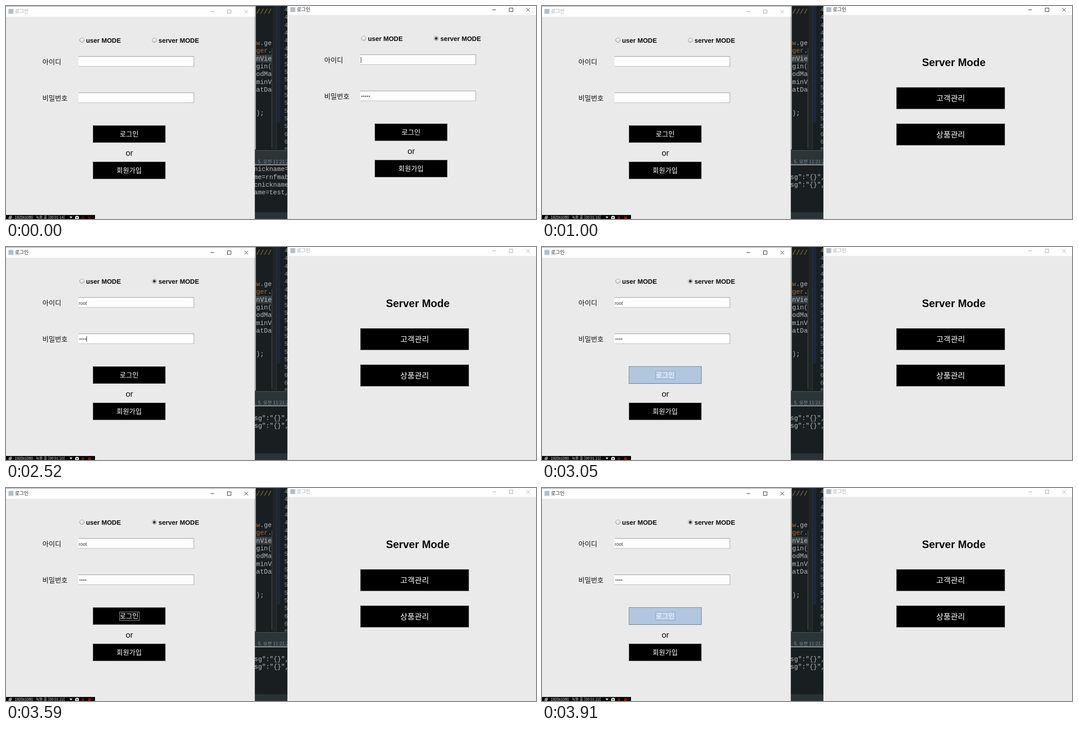
Animation of 1179x475 px, one loop 3.97 s. Source, as an HTML page:

```html
<!DOCTYPE html>
<html lang="ko">
<head>
<meta charset="utf-8">
<title>Login windows</title>
<style>
  html, body { margin: 0; width: 100%; height: 100%; overflow: hidden; background: #eaeaea; }
  svg { display: block; width: 1179px; height: 475px; }
  text { font-family: "Noto Sans CJK KR", "Noto Sans CJK", sans-serif; white-space: pre; }
  .latin { font-family: "Liberation Sans", Arial, sans-serif; }
  .bold { font-weight: 700; }
  .mono { font-family: "Liberation Mono", "Courier New", monospace; }
</style>
</head>
<body>
<svg id="stage" viewBox="0 0 1179 475" xmlns="http://www.w3.org/2000/svg"></svg>
<script>
const LOOP = 3970;
const stage = document.getElementById('stage');

const rect = (x, y, w, h, fill, extra = '') =>
  `<rect x="${x}" y="${y}" width="${w}" height="${h}" fill="${fill}" ${extra}/>`;
const path = (d, stroke, extra = '') =>
  `<path d="${d}" fill="none" stroke="${stroke}" ${extra}/>`;
const text = (x, y, size, fill, str, extra = '') =>
  `<text x="${x}" y="${y}" font-size="${size}" fill="${fill}" ${extra}>${str}</text>`;
const latin = 'class="latin"', bold = 'class="latin bold"', mono = 'class="mono"';
const middle = 'text-anchor="middle"';

const bevel = (x, y, w, h) =>
  path(`M${x + .5} ${y + h}V${y + .5}H${x + w}`, '#7c7c7c') +
  path(`M${x + w - .5} ${y}V${y + h - .5}H${x}`, '#6a6a6a');

function button(x, y, w, h, size, label, name) {
  return rect(x, y, w, h, '#000', `data-part="${name}"`) + bevel(x, y, w, h) +
    rect(x + 59.5, y + 10.5, 44, 19, 'none', `data-part="${name}Focus" visibility="hidden"`) +
    text(x + w / 2, y + h / 2 + size * .37, size, '#fff', label, middle);
}

const radio = (x, label, name) =>
  `<circle cx="${x}" cy="76.2" r="4.9" fill="url(#radioFill)" stroke="#7f8c99"/>` +
  `<circle cx="${x}" cy="76.2" r="2.9" fill="#2d3136" visibility="hidden" data-part="${name}"/>` +
  text(x + 9.2, 82.4, 14.4, '#0c0c0c', label, bold);

const field = y =>
  rect(161, y, 257.5, 24, '#fdfdfd') +
  path(`M161 ${y + .5}H418V${y + 23}`, '#8d9399') +
  path(`M161 ${y + 22.8}H418`, '#a2a8ae');

function loginForm() {
  const dots = [0, 1, 2, 3, 4].map(i =>
    `<circle cx="${164.8 + i * 4.15}" cy="205.3" r="1.3" fill="#333" data-part="dot"/>`).join('');
  return `<g data-part="form">` +
    radio(168.8, 'user MODE', 'userMode') + radio(330, 'server MODE', 'serverMode') +
    text(81, 130, 15.2, '#111', '아이디') + field(112) +
    text(81, 210.8, 15.2, '#111', '비밀번호') + field(193) +
    text(162, 128.6, 10.3, '#333', '', `${latin} data-part="id"`) + dots +
    rect(0, 0, 1, 13, '#222', 'data-part="caret"') +
    button(193, 266, 162, 39, 15.2, '로그인', 'login') +
    text(274.5, 334, 18.5, '#111', 'or', `${latin} ${middle}`) +
    button(193, 347, 162, 39, 15.2, '회원가입', 'join') + `</g>`;
}

const serverPanel = () =>
  `<g data-part="panel" visibility="hidden">` +
  text(289, 138.2, 23.6, '#080808', 'Server Mode', `${bold} ${middle}`) +
  button(161, 185, 242, 49, 17.4, '고객관리', 'customers') +
  button(161, 266, 242, 49, 17.4, '상품관리', 'goods') + `</g>`;

const appWindow = (id, dx, dy) =>
  `<g id="${id}" transform="translate(${dx} ${dy})">` +
  rect(-1, 0, 554.5, 490, '#eaeaea') + rect(-1, 1, 554.5, 23, '#fefefe') +
  path('M-1 .5H553', '#888') +
  rect(5.5, 6.5, 11, 11, '#b5bec5') +
  text(20, 16.4, 10.9, '#222', '로그인', 'data-part="title"') +
  path('M455 12.5H463M492.5 8.5H500.5V16.5H492.5ZM530.5 8.5L538.5 16.5M538.5 8.5L530.5 16.5',
    '#222', 'data-part="controls"') +
  loginForm() + serverPanel() + `</g>`;

function editor() {
  const code = [
    [17, '<tspan fill="#a88448">////</tspan>'],
    [87, '<tspan fill="#a5683c">w</tspan>.ge'],
    [104.3, '<tspan fill="#a5683c">ger</tspan>.'],
    [121.7, 'nVie'], [139, 'gin('], [156.4, 'odMa'], [173.8, 'minV'], [191, 'atDa'], [243, ');']
  ].map(([y, str]) => text(556.5, y, 14.4, '#b4b9bc', str, mono)).join('');
  const numbers = [...'4444445555555555666'].map((n, i) =>
    text(619, 12 + i * 17.36, 13.6, '#858b8e', n, mono)).join('');
  const consoleLines = (name, lines, x) =>
    `<g id="${name}" clip-path="url(#consoleClip)">` + lines.map(([y, str]) =>
      text(x, y, 14.2, '#b9bec1', str, mono)).join('') + '</g>';
  return rect(553, 0, 75, 475, '#191e20') +
    rect(556, 109, 35, 17, '#393e41') +
    `<g clip-path="url(#codeClip)">${code}</g>` +
    path('M554.8 0V322', '#d2d5d6', 'stroke-width="1.6"') + path('M591.5 94V316', '#555a5d') +
    rect(593, 0, 8, 321, '#202527') + path('M601.5 0V321', '#363b3e') +
    rect(603, 0, 7, 260, '#1d2740') + numbers +
    rect(553, 320, 74, 35, '#2d3437') + path('M553 320.5H627', '#171b1d') +
    path('M553 322.5H627', '#4c5357') +
    text(554.5, 351.3, 10.4, '#7f95a5', '. 5. 오전 11:21:2') +
    path('M553 354.3H627', '#c5c9cb', 'stroke-width="1.4"') +
    consoleLines('logBefore', [[368, 'nickname='], [385.5, 'me=rnfmab'],
      [403, 'cnickname'], [420, 'ame=test,']], 551.8) +
    consoleLines('logAfter', [[385.5, 'sg":"{}",'], [403, 'sg":"{}",']], 552.5) +
    rect(553, 460, 74, 15, '#2b3235');
}

const recorder = () =>
  rect(0, 466, 198, 9, '#050606') +
  path('M8.5 468.5H12.5V472.5H8.5ZM6.5 470.5H10.5V474.5H6.5Z', '#ddd') +
  text(19.5, 474.4, 8.2, '#ddd', '1920x1080', latin) +
  text(66.5, 474.2, 8.2, '#ddd', '', 'id="clock"') +
  '<path d="M141 469.5H148L144.5 473.5Z" fill="#eee"/>' +
  rect(154, 469, 8, 6, '#eee') + rect(156, 468, 4, 2, '#eee') +
  '<circle cx="158" cy="472" r="1.6" fill="#111"/>' +
  '<g id="bars">' + rect(168.5, 469, 5, 6, '#6c1812') + rect(183, 469, 6, 6, '#7b1b12') + '</g>';

stage.innerHTML = `<defs>
  <linearGradient id="radioFill" x1="0" y1="0" x2="0" y2="1">
    <stop stop-color="#fff"/><stop offset="1" stop-color="#cfd7de"/></linearGradient>
  <clipPath id="codeClip"><rect x="556" y="0" width="34.5" height="320"/></clipPath>
  <clipPath id="consoleClip"><rect x="553" y="355" width="74" height="105"/></clipPath>
  </defs>` + editor() + appWindow('left', 0, 0) + appWindow('right', 627, -4) + recorder();

const byId = id => document.getElementById(id);
const show = (el, on) => el.setAttribute('visibility', on ? 'inherit' : 'hidden');
const countPast = (times, t) => times.filter(at => t >= at).length;

function bindWindow(id) {
  const all = [...byId(id).querySelectorAll('[data-part]')];
  const parts = Object.fromEntries(all.map(el => [el.dataset.part, el]));
  parts.dots = all.filter(el => el.dataset.part === 'dot');
  return parts;
}
const left = bindWindow('left'), right = bindWindow('right');

function drawWindow(w, s) {
  const ink = s.active ? '#222' : '#a6a6a6';
  w.title.setAttribute('fill', ink);
  w.controls.setAttribute('stroke', ink);
  show(w.form, !s.panel);
  show(w.panel, s.panel);
  show(w.serverMode, s.server);
  w.id.textContent = s.id;
  w.dots.forEach((dot, i) => show(dot, i < s.dots));
  show(w.caret, s.caret);
  if (s.caret) {
    const inId = s.caret === 'id';
    const x = inId ? 162.3 + (s.id && w.id.getComputedTextLength()) : 162.3 + s.dots * 4.15;
    w.caret.setAttribute('x', x);
    w.caret.setAttribute('y', inId ? 118 : 198.5);
  }
  w.login.setAttribute('fill', s.pressed ? '#b0c7df' : '#000');
  w.loginFocus.setAttribute('stroke', s.pressed ? '#91abc5' : '#a5a5a5');
  show(w.loginFocus, s.focus);
}

const clockTicks = [500, 900, 1400, 1670, 1980, 2400, 2950, 3430];
const rightKeys = [70, 120, 170, 220, 280];
const idKeys = [1880, 1930, 1990, 2050];
const passwordKeys = [2330, 2390, 2450, 2520];
// Alternating press and release of the left login button.
const loginClicks = [2700, 2950, 3030, 3120, 3200, 3260, 3340, 3380,
  3500, 3590, 3620, 3700, 3760, 3840, 3910];

function render(t) {
  const leftActive = t >= 1180;
  const clicks = countPast(loginClicks, t);
  drawWindow(right, {
    active: !leftActive, panel: t >= 800, server: true,
    id: 'admin'.slice(0, countPast(rightKeys, t)), dots: 5,
    caret: t < 440 && 'id',
    pressed: t >= 470 && t < 680, focus: t >= 470
  });
  drawWindow(left, {
    active: leftActive, panel: false, server: t >= 1700,
    // The third letter appears with the second key step, so typing runs one ahead.
    id: 'root'.slice(0, countPast(idKeys, t)), dots: countPast(passwordKeys, t),
    caret: t >= 1820 && t < 2210 ? 'id' : t >= 2210 && t < 2700 && 'password',
    pressed: clicks % 2 === 1, focus: clicks > 0
  });
  show(byId('logBefore'), t < 970);
  show(byId('logAfter'), t >= 970);
  byId('clock').textContent = `녹화 중 [00:01:${14 + countPast(clockTicks, t)}]`;
  byId('bars').setAttribute('opacity', t < 440 ? .55 : 1);
}

function tick() {
  render(performance.now() % LOOP);
  requestAnimationFrame(tick);
}
tick();
</script>
</body>
</html>
```
